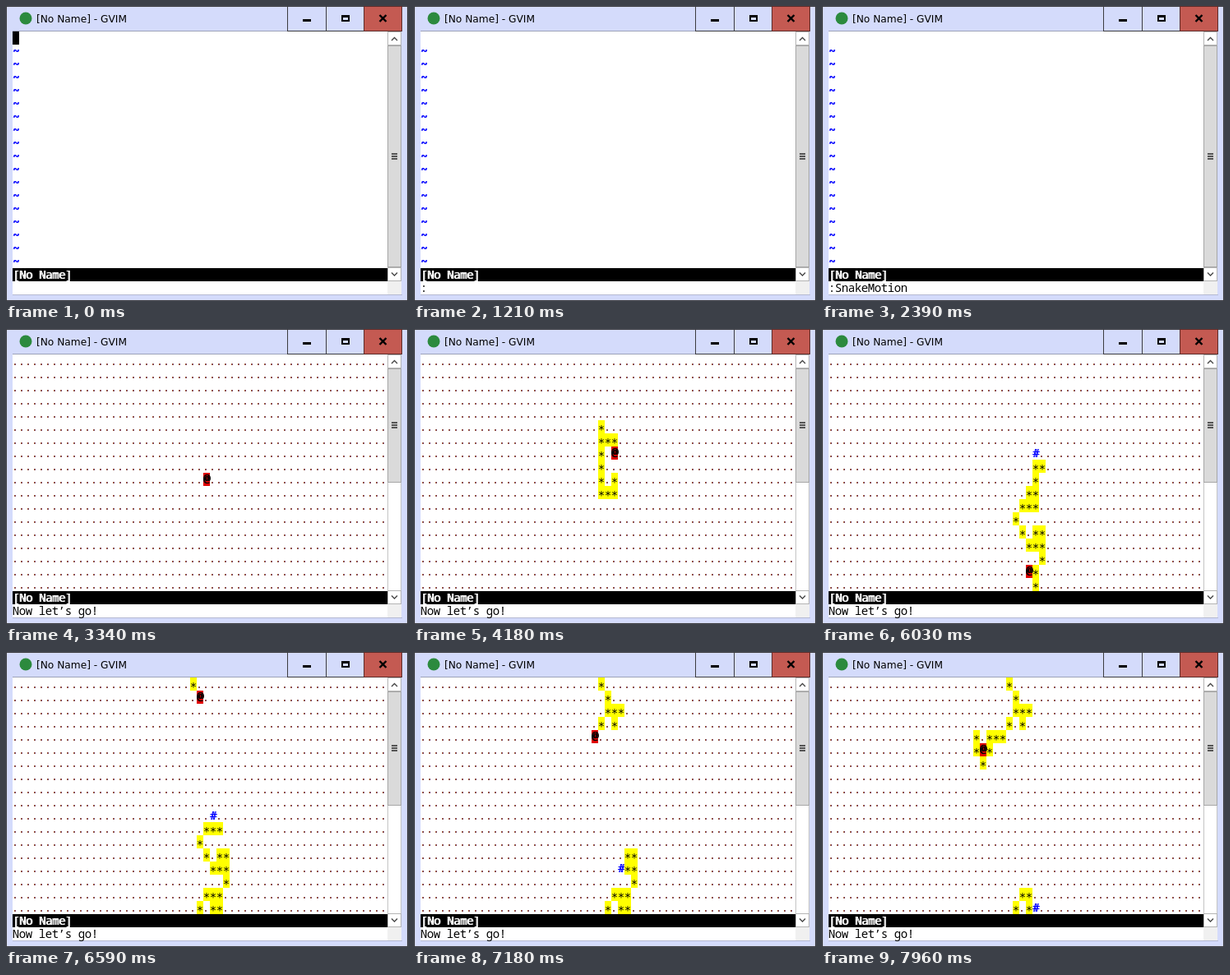
Animation, 489 px wide and 359 px high, one loop 7990 ms. Source, as an HTML page with a canvas:

```html
<!DOCTYPE html>
<html lang="en">
<head>
<meta charset="utf-8">
<title>Snake motion</title>
<style>
  html, body { margin: 0; width: 100%; height: 100%; overflow: hidden; }
  canvas { display: block; }
</style>
</head>
<body>
<canvas id="stage" width="489" height="359"></canvas>
<script>
const ctx = document.getElementById('stage').getContext('2d');
const LOOP = 7990, GAME_START = 3260;
const COLS = 57, ROWS = 18, CELL_W = 8, CELL_H = 16, LEFT = 8, TOP = 31;
const MAX_LENGTH = 20;
const TEXT_FONT = '14px "Noto Sans Mono", monospace';
const STAR_FONT = '14px "DejaVu Sans Mono", monospace';
const FRAME = '#3c3c40', CHROME = '#d4dbfb';

// Snake moves with roguelike keys: hjkl straight, yubn diagonal.
const STEPS = {
  h: [-1, 0], j: [0, 1], k: [0, -1], l: [1, 0],
  y: [-1, -1], u: [1, -1], b: [-1, 1], n: [1, 1]
};
const LEGS = [
  { end: 4180, keys: 'jhhkkkkknlj' },
  { end: 5140, keys: 'ujlnhjjhnhhbn' },
  { end: 6030, keys: 'nlkljjbjy' },
  { end: 7180, keys: 'jybbnnlbybb' },
  { end: 7960, keys: 'hhjbykn' }
];
const path = [[29, 9]];
for (const key of LEGS.map(leg => leg.keys).join('')) {
  const [x, y] = path[path.length - 1], [dx, dy] = STEPS[key];
  path.push([x + dx, (y + dy + ROWS) % ROWS]);
}

function rect(color, x, y, w, h) {
  ctx.fillStyle = color;
  ctx.fillRect(x, y, w, h);
}

function box(fill, stroke, x, y, w, h) {
  rect(stroke, x, y, w, h);
  rect(fill, x + 1, y + 1, w - 2, h - 2);
}

function line(color, width, ...points) {
  ctx.strokeStyle = color;
  ctx.lineWidth = width;
  ctx.beginPath();
  for (const [x, y] of points) ctx.lineTo(x, y);
  ctx.stroke();
}

function fillCell(color, col, row) {
  rect(color, LEFT + col * CELL_W, TOP + row * CELL_H, CELL_W, CELL_H);
}

// Bold is the regular face printed again one pixel to the right.
function print(text, col, row, { color = '#000', bold = false, font = TEXT_FONT, dy = 0 } = {}) {
  ctx.font = font;
  ctx.fillStyle = color;
  ctx.textAlign = 'center';
  [...text].forEach((char, i) => {
    const x = LEFT + (col + i + 0.5) * CELL_W, y = TOP + row * CELL_H + 13 + dy;
    ctx.fillText(char, x, y);
    if (bold) ctx.fillText(char, x + 1, y);
  });
}

function drawWindow() {
  box(CHROME, FRAME, 0, 0, 489, 359);
  ctx.fillStyle = '#2c8a3e';
  ctx.beginPath();
  ctx.arc(24, 15, 7.5, 0, Math.PI * 2);
  ctx.fill();
  ctx.font = '12.2px "DejaVu Sans", sans-serif';
  ctx.textAlign = 'left';
  ctx.fillStyle = '#000';
  ctx.fillText('[No Name] - GVIM', 37, 20);

  box(CHROME, FRAME, 342, 0, 48, 31);
  box(CHROME, FRAME, 389, 0, 47, 31);
  box('#c45a52', '#5c2c2a', 435, 0, 47, 31);
  rect('#000', 361, 16, 10, 3);
  rect('#000', 408, 11, 10, 8);
  rect(CHROME, 410, 14, 6, 3);
  line('#000', 2.4, [454.5, 11], [462.5, 19]);
  line('#000', 2.4, [462.5, 11], [454.5, 19]);

  rect('#9da2b8', 8, 30, 334, 1);
  rect('#fff', 8, 31, 456, 320);
  rect('#b4b9d2', 8, 351, 474, 1);
}

function drawScrollbar(thumbHeight) {
  box('#fff', '#c4c4c4', 464, 31, 17, 304);
  rect('#f0f0f0', 464, 335, 17, 16);
  box('#fff', '#b4b4b4', 464, 31, 17, 17);
  box('#fff', '#b4b4b4', 464, 318, 17, 17);
  line('#444', 1.3, [469, 42], [472.5, 38.5], [476, 42]);
  line('#444', 1.3, [469, 324.5], [472.5, 328], [476, 324.5]);
  box('#dadada', '#a6a6a6', 464, 48, 17, thumbHeight);
  const middle = 48 + Math.floor(thumbHeight / 2);
  for (const dy of [-4, -1, 2]) rect('#555', 469, middle + dy, 7, 2);
}

function drawCommand(t) {
  for (let row = 1; row < ROWS; row++) print('~', 0, row, { color: '#00f', bold: true });
  if (t < 530) {
    if (t < 340) fillCell('#000', 0, 0);
    return;
  }
  const text = t < 1390 ? ':' : t < 1740 ? ':S' : ':SnakeMotion';
  const blinkOff = (t >= 1210 && t < 1390) || (t >= 2390 && t < 2650) || t >= 3060;
  print(text, 0, ROWS + 1);
  if (!blinkOff) fillCell('#000', text.length, ROWS + 1);
}

function headIndex(t) {
  let index = 0, start = GAME_START;
  for (const { end, keys } of LEGS) {
    if (t < end) return index + Math.floor((t - start) / (end - start) * keys.length);
    index += keys.length;
    start = end;
  }
  return index;
}

function drawGame(t) {
  for (let row = 0; row < ROWS; row++) {
    for (let col = 0; col < COLS; col++) {
      const x = LEFT + col * CELL_W + 2, y = TOP + row * CELL_H + 11;
      rect('#a0582c', x, y, 1, 2);
      rect('#7c4a74', x + 1, y, 1, 2);
    }
  }
  const head = headIndex(t), tail = head - MAX_LENGTH + 1;
  for (let i = Math.max(0, tail); i <= head; i++) {
    const [col, row] = path[i];
    if (i === head) {
      fillCell('#e00000', col, row);
      print('@', col, row, { bold: true, dy: -1 });
    } else if (i === tail) {
      fillCell('#fff', col, row);
      print('#', col, row, { color: '#00f', bold: true });
    } else {
      fillCell('#ff0', col, row);
      print('*', col, row, { font: STAR_FONT, dy: 3 });
    }
  }
  print('Now let’s go!', 0, ROWS + 1);
}

function draw() {
  const t = performance.now() % LOOP, playing = t >= GAME_START;
  drawWindow();
  drawScrollbar(playing ? 139 : 270);
  rect('#000', 8, 319, 456, 16);
  print('[No Name]', 0, ROWS, { color: '#fff', bold: true });
  (playing ? drawGame : drawCommand)(t);
  requestAnimationFrame(draw);
}
draw();
</script>
</body>
</html>
```
